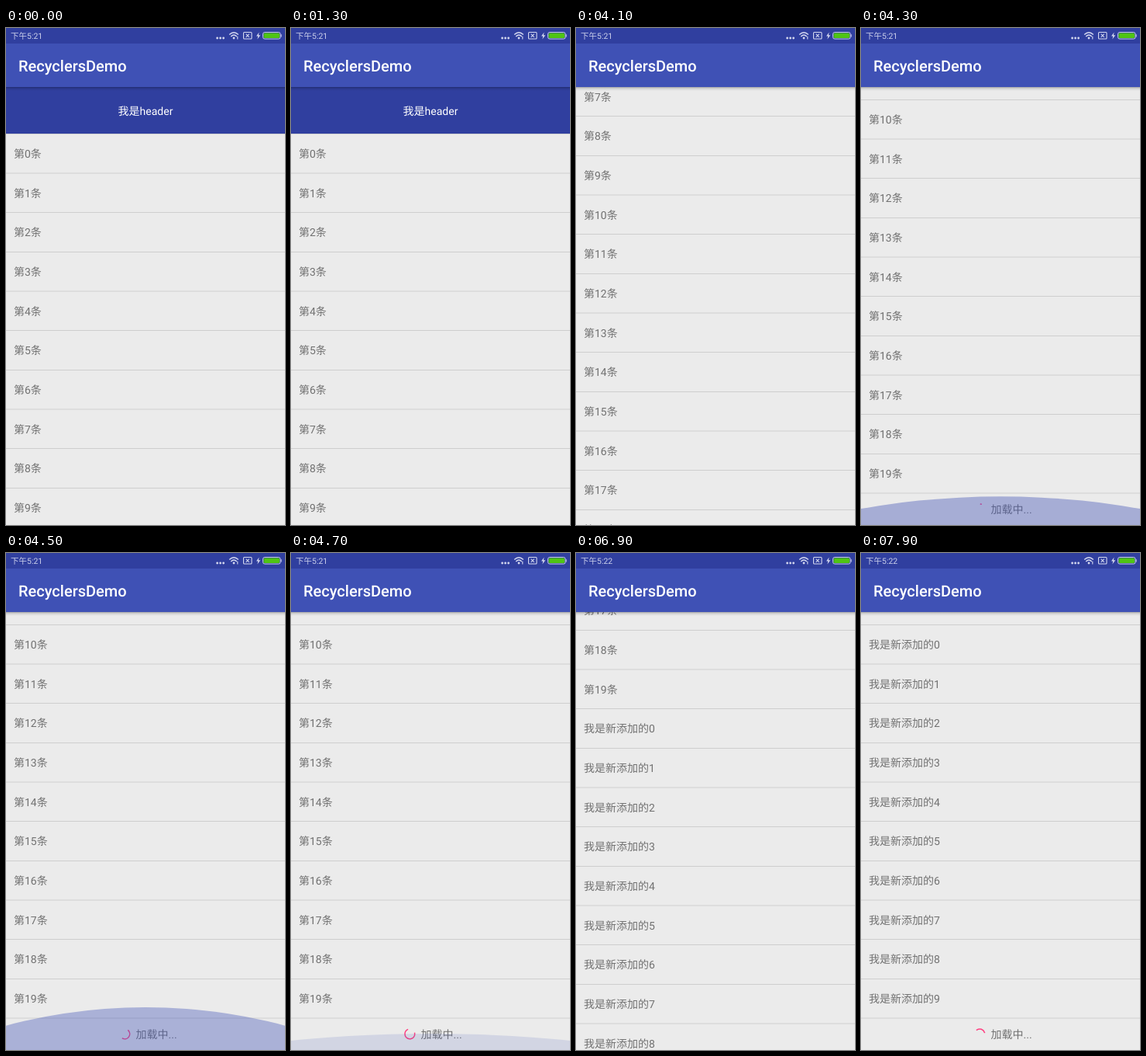
Write an HTML page that moves like this. It is 360 px wide and 640 px high and loops after 8000 ms.

```html
<!DOCTYPE html>
<html lang="zh-CN">
<head>
<meta charset="utf-8">
<title>RecyclersDemo</title>
<style>
  html, body { margin: 0; width: 100%; height: 100%; overflow: hidden; background: #ebebeb; }
  svg { display: block; width: 360px; height: 640px; }
  text {
    font: 14px Roboto, "Noto Sans CJK SC", "Noto Sans CJK", sans-serif;
    fill: #717171; white-space: pre; text-rendering: geometricPrecision;
  }
  .white { fill: #fff; }
  .title { font-size: 20px; font-weight: 500; }
  .clock { font-size: 10.5px; fill: #ccd1ec; }
  .line { fill: #c0c0c0; }
  .icon { fill: none; stroke: #d5d9f0; stroke-width: 1.1; }
</style>
</head>
<body>
<svg viewBox="0 0 360 640">
  <defs>
    <linearGradient id="shade" x2="0" y2="1">
      <stop offset="0" stop-color="#000" stop-opacity=".3"/>
      <stop offset=".4" stop-color="#000" stop-opacity=".1"/>
      <stop offset="1" stop-color="#000" stop-opacity="0"/>
    </linearGradient>
  </defs>
  <rect width="360" height="640" fill="#ebebeb"/>

  <g id="list">
    <rect y="76" width="360" height="60" fill="#303f9f"/>
    <text class="white" x="180" y="111.5" text-anchor="middle">我是header</text>
    <rect class="line" y="136" width="360" height=".67"/>
    <g id="rows"></g>
    <g id="added"></g>
    <g id="footer">
      <path id="spinner" fill="none" stroke="#ff4081" stroke-width="1.5" stroke-linecap="square"/>
      <text x="167.5" y="25.3">加载中...</text>
    </g>
  </g>

  <ellipse id="glow" cx="180" rx="540" fill="#3f51b5"/>

  <rect y="76" width="360" height="5" fill="url(#shade)"/>
  <rect y="20" width="360" height="56" fill="#3f51b5"/>
  <rect width="360" height="20" fill="#303f9f"/>
  <text class="white title" x="16" y="56">RecyclersDemo</text>
  <text id="clock" class="clock" x="6" y="14"></text>

  <g fill="#d5d9f0">
    <circle cx="272.6" cy="13" r="1.4"/>
    <circle cx="276.6" cy="13" r="1.4"/>
    <circle cx="280.6" cy="13" r="1.4"/>
    <path d="M326.6 5.5L323 10.6H325.3L324.4 14.5L328.2 9.2H325.8Z"/>
    <circle cx="294" cy="13" r="1.4"/>
  </g>
  <g class="icon">
    <path d="M288.2 8.6Q294 2.8 299.8 8.6M290.2 10.9Q294 7 297.8 10.9" stroke-width="1.4"/>
    <path d="M298.8 10.8V14.6"/>
    <rect x="306.5" y="5.5" width="10.5" height="8.5" rx="1"/>
    <path d="M309.7 7.7L313.8 11.8M313.8 7.7L309.7 11.8"/>
    <rect x="331.5" y="5.5" width="22.6" height="8.6" rx="2.4" stroke-width=".9"/>
    <path d="M355 8.2V11.4"/>
  </g>
  <rect x="332.5" y="6.5" width="20.6" height="6.6" rx="1.5" fill="#4fc414"/>
</svg>

<script>
const LOOP = 8000, STEP = 100;
const ROW = 152 / 3, TOP = 136 + 2 / 3;   // 3 device pixels per unit
const END = 550.67, NEW_END = END + 10 * ROW;
const ADDED_AT = 6400, MINUTE_AT = 5800;
const HIT = 4247, PEAK = 4424, RECEDE = 600;

// [time, scroll offset]
const scrollKeys = [
  [3550, 0], [3600, 18], [3700, 80], [3900, 250], [4100, 428], [HIT, END],
  [6620, END], [6700, 612], [6800, 786], [6900, 949], [7000, 1027],
  [7100, 1050], [7200, NEW_END]
];

const $ = id => document.getElementById(id);
const clamp = v => Math.max(0, Math.min(1, v));
const decelerate = u => 1 - (1 - u) ** 2;
const rowTop = i => TOP + ROW * i;

function addRows(group, first, count, label) {
  let out = "";
  for (let i = 0; i < count; i++) {
    const y = rowTop(first + i);
    out += `<text x="10" y="${y + 30.3}">${label(i)}</text>` +
      `<rect class="line" y="${y + 50}" width="360" height=".67"/>`;
  }
  group.innerHTML = out;
}

function scrollAt(t) {
  const i = scrollKeys.findIndex(k => k[0] > t);
  if (i === 0) return 0;
  if (i < 0) return NEW_END;
  const [t0, y0] = scrollKeys[i - 1], [t1, y1] = scrollKeys[i];
  return y0 + (y1 - y0) * (t - t0) / (t1 - t0);
}

// cubic-bezier(.4, 0, .2, 1)
function fastOutSlowIn(x) {
  let lo = 0, hi = 1;
  for (let i = 0; i < 20; i++) {
    const s = (lo + hi) / 2, r = 1 - s;
    if (1.2 * r * r * s + .6 * r * s * s + s ** 3 < x) lo = s; else hi = s;
  }
  return 3 * (1 - lo) * lo * lo + lo ** 3;
}

function spinnerPath(age) {
  const phase = age % 1333 / 1333;
  const turn = phase * .25 + age / 6665 * 2;
  const from = turn + .75 * fastOutSlowIn(clamp(phase * 2 - 1));
  const to = turn + .75 * fastOutSlowIn(clamp(phase * 2));
  const at = f => {
    const a = f * 2 * Math.PI;
    return `${153.3 + 6.4 * Math.sin(a)} ${20 - 6.4 * Math.cos(a)}`;
  };
  return `M${at(from)}A6.4 6.4 0 ${to - from > .5 ? 1 : 0} 1 ${at(to)}`;
}

function drawGlow(t) {
  let size = 0, alpha = 0;
  if (t >= HIT && t < PEAK) {
    size = decelerate((t - HIT) / (PEAK - HIT));
    alpha = .3 + .2 * size;
  } else if (t >= PEAK) {
    size = 1 - decelerate(clamp((t - PEAK) / RECEDE));
    alpha = .5 * size;
  }
  const glow = $("glow");
  glow.setAttribute("ry", 540 * size);
  glow.setAttribute("cy", 640 + 468 * size);
  glow.setAttribute("opacity", alpha);
}

function draw(t) {
  const loaded = t >= ADDED_AT;
  $("list").setAttribute("transform", `translate(0 ${-scrollAt(t)})`);
  $("added").setAttribute("visibility", loaded ? "visible" : "hidden");
  $("footer").setAttribute("transform", `translate(0 ${rowTop(loaded ? 30 : 20)})`);
  $("spinner").setAttribute("d", spinnerPath(Math.max(0, t - (loaded ? 6973 : 4240))));
  $("clock").textContent = t < MINUTE_AT ? "下午5:21" : "下午5:22";
  drawGlow(t);
}

addRows($("rows"), 0, 20, i => `第${i}条`);
addRows($("added"), 20, 10, i => `我是新添加的${i}`);

const start = performance.now();
function tick() {
  const t = (performance.now() - start) % LOOP;
  draw(Math.floor(t / STEP) * STEP);
  requestAnimationFrame(tick);
}
tick();
</script>
</body>
</html>
```
